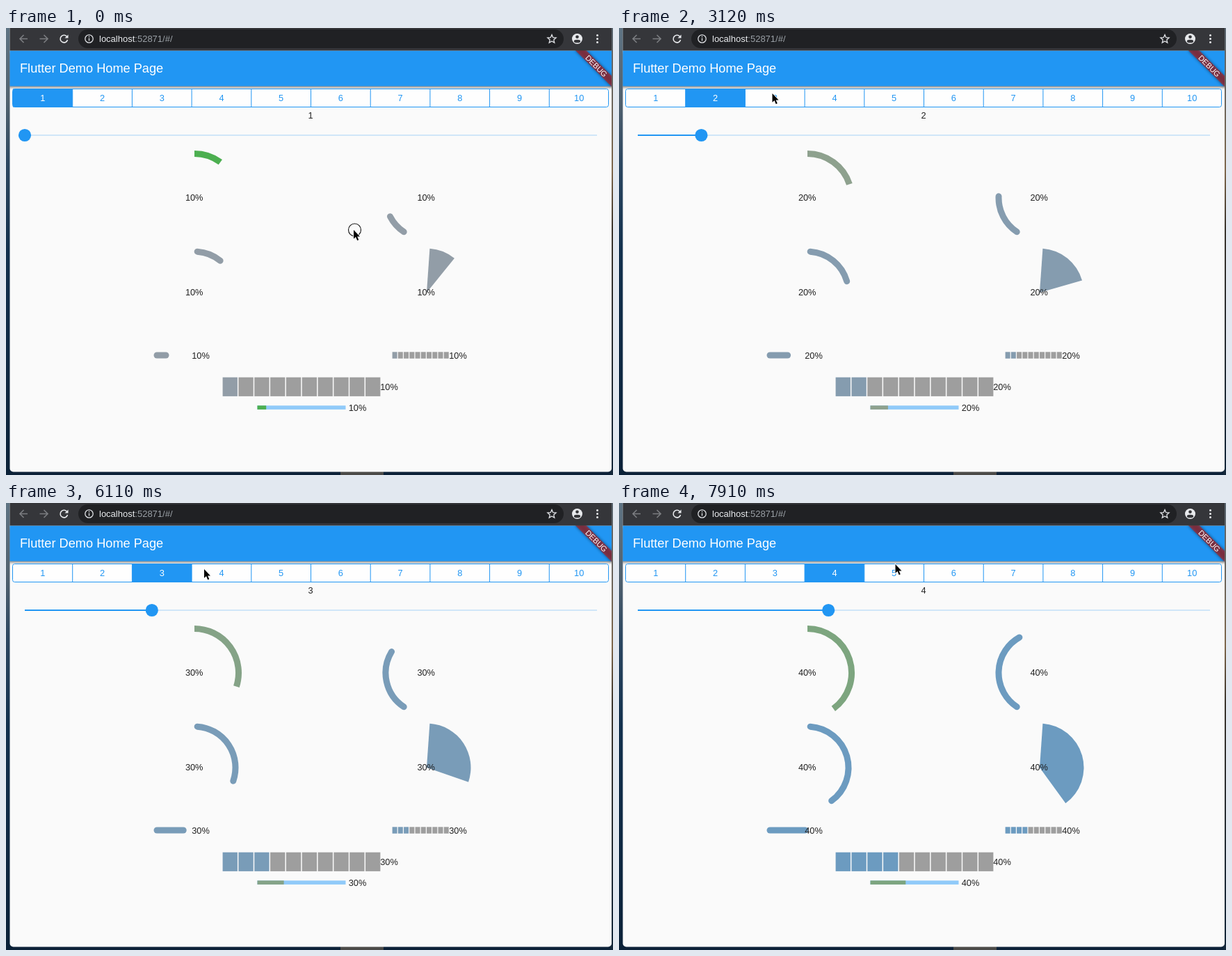
Recreate the animation shown at these times as an HTML page. Size 873x642 px, loop 8000 ms.

```html
<!DOCTYPE html>
<html lang="en">
<head>
<meta charset="utf-8">
<title>Progress indicators</title>
<style>
  html, body { margin: 0; width: 100%; height: 100%; overflow: hidden; background: #0c2138; }
  svg { display: block; }
  text { font: 12.8px "Liberation Sans", Arial, sans-serif; fill: #212121; }
  .mid { text-anchor: middle; }
  .line { fill: none; stroke-linecap: round; }
</style>
</head>
<body>
<svg id="stage" width="873" height="642" viewBox="0 0 873 642">
  <defs>
    <linearGradient id="left" x2="0" y2="1">
      <stop offset="0" stop-color="#5f7484"/>
      <stop offset=".16" stop-color="#52626f"/>
      <stop offset=".3" stop-color="#2c4761"/>
      <stop offset=".5" stop-color="#12304d"/>
      <stop offset="1" stop-color="#0b2138"/>
    </linearGradient>
    <linearGradient id="right" x2="0" y2="1">
      <stop offset="0" stop-color="#5b6772"/>
      <stop offset=".32" stop-color="#80694e"/>
      <stop offset=".45" stop-color="#3c362f"/>
      <stop offset="1" stop-color="#14273a"/>
    </linearGradient>
    <clipPath id="window"><rect x="5.5" y="-10" width="865.5" height="647.5" rx="5"/></clipPath>
    <filter id="soft" x="-30%" y="-100%" width="160%" height="300%"><feGaussianBlur stdDeviation="2"/></filter>
  </defs>

  <rect width="873" height="642" fill="#0c2138"/>
  <rect width="7" height="642" fill="url(#left)"/>
  <rect x="869" width="4" height="642" fill="url(#right)"/>
  <rect x="481" y="637" width="62" height="5" fill="#4b4a48"/>

  <g clip-path="url(#window)">
    <rect width="873" height="642" fill="#fafafa"/>
    <rect y="35" width="873" height="50" opacity=".55" filter="url(#soft)"/>
    <rect y="32.5" width="873" height="51" fill="#2196f3"/>
    <text x="20" y="64" style="font-size:18.2px;fill:#fff">Flutter Demo Home Page</text>

    <g transform="translate(871 32.5) rotate(45)">
      <rect x="-37" y="25.6" width="74" height="11" opacity=".5" filter="url(#soft)"/>
      <rect x="-37" y="25.6" width="74" height="11" fill="#b71c1c" fill-opacity=".63"/>
      <text class="mid" y="35" style="font-size:11px;fill:#fff">DEBUG</text>
    </g>

    <rect width="873" height="32.5" fill="#35363a"/>
    <rect x="104" y="2" width="698" height="27" rx="13.5" fill="#202124"/>
    <g fill="none" stroke="#7b7d81" stroke-width="1.6">
      <path d="M31 15.5H20m5.5-5.5l-5.5 5.5l5.5 5.5"/>
      <path d="M48.5 15.5H60m-5.5-5.5l5.5 5.5l-5.5 5.5"/>
      <path d="M87.3 12A5.3 5.3 0 1 0 88.5 17" stroke="#e8eaed"/>
      <g stroke="#dfe1e5" stroke-width="1.3">
        <circle cx="119.5" cy="15.5" r="5.7"/>
        <path d="M119.5 14.5v4m0-6.8v1.5"/>
        <path id="star"/>
      </g>
    </g>
    <path d="M89.5 9.5v5h-5Z" fill="#e8eaed"/>
    <g fill="#e8eaed">
      <circle cx="821.5" cy="15.5" r="7.5"/>
      <circle cx="850.5" cy="10.5" r="1.5"/>
      <circle cx="850.5" cy="15.5" r="1.5"/>
      <circle cx="850.5" cy="20.5" r="1.5"/>
    </g>
    <g fill="#35363a">
      <circle cx="821.5" cy="12.8" r="2.3"/>
      <ellipse cx="821.5" cy="19" rx="4.7" ry="2.3"/>
    </g>
    <text x="134" y="20" style="font-size:13px;fill:#e8eaed">localhost<tspan fill="#9aa0a6">:52871/#/</tspan></text>

    <g id="app"></g>
  </g>

  <g id="pointer">
    <circle id="ring" cx="1.5" r="9" fill="none" stroke="#111" stroke-width="1.1"/>
    <path d="M0 0V12.8L3 10.1L5.2 15.2L7.3 14.3L5.1 9.4H9Z" stroke="#fff" stroke-width="1.5" paint-order="stroke"/>
  </g>
</svg>

<script>
const LOOP = 8000, BEAT = 150;
const BLUE = [33, 150, 243], GREEN = [76, 175, 80], GREY = Array(3).fill(158), WHITE = Array(3).fill(254);
const $ = id => document.getElementById(id);

// Pointer stops: time, x, y
const moves = [
  [0, 500, 290], [740, 405, 247], [890, 225, 174], [1190, 143, 99],
  [2530, 192, 97], [2680, 220.5, 94],
  [5820, 232, 95], [5970, 266, 95], [6110, 285, 95],
  [7460, 412, 108], [7760, 404, 96], [7910, 397.5, 88]
];
// Click ring: shown from, until
const rings = [[0, 150], [1940, 2240], [2980, 3120], [5220, 5370], [6860, 7160]];
// Each tap raises the value; its tab is pressed one beat before and fades in one beat after
const taps = [2240, 5370, 7160];

function set(el, attrs) {
  for (const k in attrs) el.setAttribute(k, attrs[k]);
}
function add(tag, attrs, text) {
  const el = document.createElementNS("http://www.w3.org/2000/svg", tag);
  set(el, attrs);
  if (text) el.textContent = text;
  return $("app").appendChild(el);
}
const rect = (x, y, width, height, fill) => add("rect", { x, y, width, height, fill });
const label = (x, y) => add("text", { x, y, class: "mid" });
const row = (n, make) => Array.from({ length: n }, (_, i) => make(i));
const mix = (a, b, k) => `rgb(${a.map((c, i) => Math.round(c + (b[i] - c) * k))})`;

// Angles in degrees, clockwise from twelve o'clock
function at(cx, cy, r, deg) {
  const a = deg * Math.PI / 180;
  return `${(cx + r * Math.sin(a)).toFixed(2)} ${(cy - r * Math.cos(a)).toFixed(2)}`;
}
const arc = (cx, cy, r, from, to) =>
  `M${at(cx, cy, r, from)}A${r} ${r} 0 ${to - from > 180 ? 1 : 0} 1 ${at(cx, cy, r, to)}`;

set($("star"), { d: "M" + row(10, i => at(785, 16, i % 2 ? 2.9 : 6.4, i * 36)).join("L") + "Z" });

// Tab row
const TAB = 85.7;
const tabs = row(10, i => {
  const tab = { box: rect(10 + i * TAB, 87.5, TAB, 26), text: label(10 + (i + .5) * TAB, 105.2) };
  tab.text.textContent = i + 1;
  return tab;
});
row(9, i => rect(9.5 + (i + 1) * TAB, 87.5, 1, 26, "#2196f3"));
add("rect", { x: 9.5, y: 87.5, width: 857, height: 26, rx: 3, fill: "none", stroke: "#2196f3" });

// Slider
const count = label(438, 129.6);
rect(27, 153.2, 823, 1.6, "#c6e2f8");
const track = rect(27, 153, 0, 2, "#2196f3");
const thumb = add("circle", { cy: 154, r: 9.1, fill: "#2196f3" });

// Indicators
const line = { class: "line", "stroke-width": 9 };
const greenArc = add("path", { fill: "none", "stroke-width": 9 });
const sideArc = add("path", line);
const roundArc = add("path", line);
const pie = add("path", {});
const bar = add("path", line);
const cells = row(10, i => [
  rect(555.6 + i * 8.24, 465.3, 7, 9.4),
  rect(311.6 + i * 22.83, 501.7, 21.3, 27.2)
]);
rect(361.5, 542.3, 127, 5.6, "#90caf9");
const progress = rect(361.5, 542.3, 0, 5.6);
const percents = [
  ...row(4, i => label(i % 2 ? 604.2 : 270.7, i < 2 ? 248.4 : 384.4)),
  label(280, 474.6), label(650, 474.6), label(551, 520.2), label(505.5, 550)
];

function drawTabs(value, pressed, fade) {
  tabs.forEach(({ box, text }, i) => {
    const n = i + 1;
    let fill = n === pressed ? .2 : 0, ink = 0;
    if (n === value) {
      fill = .2 + .8 * fade;
      ink = fade;
    } else if (n === value - 1) {
      fill = ink = 1 - fade;
    }
    box.setAttribute("fill", mix(WHITE, BLUE, fill));
    text.style.fill = mix(BLUE, Array(3).fill(255), ink);
  });
}

function drawValue(value) {
  const blue = mix(GREY, BLUE, value / 10);
  const green = mix(GREY, GREEN, value > 1 ? value / 10 : 1);
  const pos = (value - 1) * 91.4, end = 4 + 35 * value;

  count.textContent = value;
  set(track, { width: pos });
  set(thumb, { cx: 27 + pos });
  set(greenArc, { d: arc(271, 244, 63.5, 0, 36 * value), stroke: green });
  set(sideArc, { d: arc(604.5, 244, 58.5, 213.5, 213.5 + 29.3 * value), stroke: blue });
  set(roundArc, { d: arc(271, 380, 59, 4, end), stroke: blue });
  set(pie, { d: arc(605, 380, 63.5, 4, end) + "L605 380Z", fill: blue });
  set(bar, { d: `M217 470H${217.4 + 12.6 * value}`, stroke: blue });
  cells.forEach((pair, i) => pair.forEach(c => set(c, { fill: i < value ? blue : "#9e9e9e" })));
  set(progress, { width: 12.7 * value, fill: green });
  percents.forEach(p => p.textContent = value * 10 + "%");
}

function tick() {
  const t = performance.now() % LOOP;
  const [, x, y] = moves.findLast(m => m[0] <= t);
  const value = 1 + taps.filter(tap => tap <= t).length;
  const pressed = taps.findIndex(tap => t >= tap - BEAT && t < tap) + 2;
  const fading = taps.some(tap => t >= tap && t < tap + BEAT);

  drawTabs(value, pressed > 1 ? pressed : 0, fading ? .88 : 1);
  drawValue(value);
  $("ring").style.display = rings.some(([a, b]) => t >= a && t < b) ? "" : "none";
  set($("pointer"), { transform: `translate(${x} ${y})` });
  requestAnimationFrame(tick);
}
tick();
</script>
</body>
</html>
```
